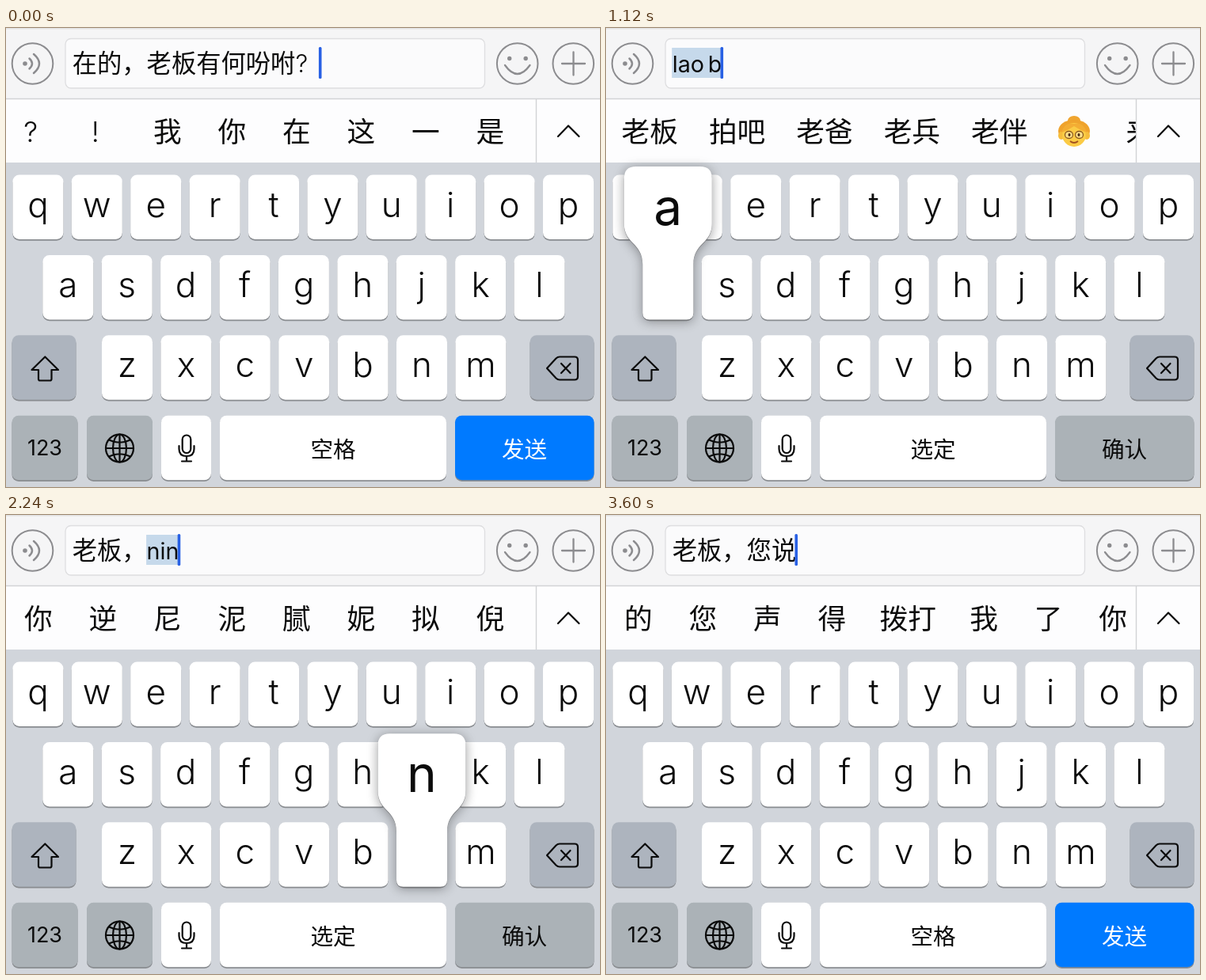
Write an HTML page that moves like this. It is 750x580 px and loops after 3640 ms.

```html
<!DOCTYPE html>
<html lang="zh-CN">
<head>
<meta charset="utf-8">
<style>
  html, body { margin: 0; width: 100%; height: 100%; overflow: hidden; background: #d1d5db; }
  svg { display: block; width: 750px; height: 580px; }
  text { font-family: Inter, "Noto Sans CJK SC", "Noto Sans CJK", sans-serif; font-weight: 400; fill: #0b0b0b; }
  .mid { text-anchor: middle; }
  .key { font-size: 44px; font-weight: 300; text-anchor: middle; }
  .label { font-size: 28.6px; font-weight: 300; text-anchor: middle; }
  .cand { font-size: 35.7px; font-weight: 300; }
  .field { font-size: 31.3px; font-weight: 300; }
  .icon { fill: none; stroke: #0b0b0b; stroke-width: 2.2; stroke-linejoin: round; stroke-linecap: round; }
  .tool { fill: none; stroke: #8c8c8f; stroke-width: 2; stroke-linecap: round; }
  #pop path { fill: #fff; filter: drop-shadow(0 2px 7px rgba(0, 0, 0, .28)) drop-shadow(0 1px 0 #898b8f); }
</style>
</head>
<body>
<svg viewBox="0 0 750 580">
  <rect width="750" height="580" fill="#d1d5db"/>
  <rect width="750" height="90" fill="#f5f5f6"/>
  <rect width="750" height="1.5" fill="#e3e3e4"/>
  <rect x="75" y="13.5" width="529.5" height="62.5" rx="7" fill="#fbfbfc" stroke="#dedee0" stroke-width="1.3"/>
  <g class="tool">
    <circle cx="33.5" cy="45" r="25.8"/>
    <circle cx="645.7" cy="45" r="25.8"/>
    <circle cx="716.3" cy="45" r="25.8"/>
    <path d="M29.5 38.5Q36.5 45 29.5 51.5M35 33Q49 45 35 57" stroke-width="2.5"/>
    <path d="M630 47Q645.7 69 661.500 47M702 45H731M716.500 30.500V59.500" stroke-width="2.3"/>
    <g fill="#8c8c8f" stroke="none">
      <circle cx="24" cy="45" r="2.8"/>
      <circle cx="635.7" cy="38.5" r="2.7"/>
      <circle cx="656.2" cy="38.5" r="2.7"/>
    </g>
  </g>
  <rect id="mark" y="25" height="38" fill="#c6d9eb"/>
  <text id="done" class="field" y="56"></text>
  <text id="typing" y="55.500" font-size="28.7"></text>
  <rect id="caret" y="24" width="3.600" height="40" rx="1.500" fill="#2860e4"/>

  <rect y="90" width="750" height="80" fill="#fdfdfe"/>
  <g id="cands"></g>
  <rect x="669" y="90" width="81" height="80" fill="#fdfdfe"/>
  <path d="M0 89.500H750M669.500 90V170" stroke="#d2d3d5" stroke-width="1.400"/>
  <path d="M697 137L710 123.500L723.500 137" class="icon" stroke-linecap="butt"/>

  <g id="keys"></g>
  <path class="icon" d="M49.300 415.500L66 432H57.500V443.500Q57.500 445.500 55.500 445.500H43Q41 445.500 41 443.500V432H32.500Z"/>
  <g id="del" class="icon">
    <path d="M683 430L694.500 417.500Q696.500 415.500 699 415.500H718Q722 415.500 722 419.500V440.500Q722 444.500 718 444.500H699Q696.500 444.500 694.500 442.500Z"/>
    <path id="cross" d="M701 424L712.500 436M712.500 424L701 436"/>
  </g>
  <g class="icon" stroke-width="2">
    <circle cx="143.500" cy="531" r="17.500"/>
    <ellipse cx="143.500" cy="531" rx="8.500" ry="17.500"/>
    <path d="M126 531H161M143.500 513.500V548.500M130 520.500Q143.500 527 157 520.500M130 541.500Q143.500 535 157 541.500"/>
    <rect x="222.700" y="514.500" width="10.600" height="22.500" rx="5.300"/>
    <path d="M218.500 528V532Q218.500 541 228 541T237.500 532V528M228 541V547M222 547.500H234"/>
  </g>
  <text x="49" y="540" class="mid" font-size="27">123</text>
  <text id="space" x="413" y="543" class="label"></text>
  <text id="send" x="654.500" y="543" class="label"></text>
  <g id="pop"><path/><text class="mid" font-size="64" font-weight="300"></text></g>
</svg>
<script>
const LOOP = 3640, STEP = 40, X0 = 83.7, EM = 31.3, GAP = '\u2006';
const $ = id => document.getElementById(id);

function add(parent, tag, attrs, text = '') {
  const el = document.createElementNS('http://www.w3.org/2000/svg', tag);
  set(el, attrs);
  el.textContent = text;
  parent.append(el);
  return el;
}
function set(el, attrs) {
  for (const name in attrs) el.setAttribute(name, attrs[name]);
}

// Keyboard
const GREY = '#adb4be', DIM = '#abb2b7';
const keyPos = {};
function cap(x, y, w, fill = '#fff') {
  add($('keys'), 'rect', { x, y: y + 1.8, width: w, height: 81.500, rx: 8.500, fill: '#898c90' });
  return add($('keys'), 'rect', { x, y, width: w, height: 81.500, rx: 8.500, fill });
}
[['qwertyuiop', 8.400, 185.500], ['asdfghjkl', 46.300, 287], ['zxcvbnm', 121, 388.300]].forEach(([row, left, y]) => {
  [...row].forEach((ch, i) => {
    const x = left + i * 74.400;
    keyPos[ch] = { x, y };
    cap(x, y, 64);
    add($('keys'), 'text', { x: x + 32, y: y + 53, class: 'key' }, ch);
  });
});
cap(7.500, 388.300, 81, GREY);
const delCap = cap(661.500, 388.300, 81, GREY);
cap(7.500, 489.800, 83, DIM);
cap(102, 489.800, 83, DIM);
cap(196, 489.800, 63);
cap(270, 489.800, 286);
const sendCap = cap(567, 489.800, 175.500, DIM);

// Timeline: [time, committed text, composing text]
const full = '在的，老板有何吩咐?', lead = '老板，';
const texts = [[0, full, ''], [80, full.slice(0, -1), '']];
for (let i = 8; i >= 0; i--) texts.push([200 + (8 - i) * STEP, full.slice(0, i), '']);

const presses = [
  [880, 'l'], [960, 'a'], [1000, 'o'], [1040, 'b'], [1120, 'a'], [1200, 'n'],
  [2040, 'n'], [2120, 'i'], [2200, 'n'], [2320, 's'], [2400, 'h'], [2480, 'u'], [2520, 'o']
];
function compose(keys, before, gapAt) {
  let word = '';
  keys.forEach(([t, ch]) => {
    word += (word.length === gapAt ? GAP : '') + ch;
    texts.push([t + STEP, before, word]);
  });
}
compose(presses.slice(0, 6), '', 3);
texts.push([1400, '老板', ''], [1760, lead, '']);
compose(presses.slice(6), lead, 3);
texts.push([2880, lead + '您说', '']);

const idle = '我 你 这 在 一 是 好 有';
const hints = [
  [0, '? ! 我 你 在 这 一 是'], [240, idle],
  [960, '了 来 里 啦 老 两 连 路'], [1040, '拉 啦 来 老 辣 蓝 浪 落'], [1080, '老 捞 劳 牢 姥 烙 涝 佬'],
  [1120, '老板 拍吧 老爸 老兵 老伴 @ 来'], [1240, '老爸 老板 老八 老伴 老把 捞'],
  [1280, '老板 老伴 老班 老版 老办 捞'], [1400, '说 的 你 是 给 不 还 来'], [1760, idle],
  [2120, '你 那 年 呢 能 哪 拿 女'], [2200, '你 逆 尼 泥 腻 妮 拟 倪'], [2280, '您 恁 你 逆 尼 泥 腻 妮'],
  [2400, '您是 您说 您 恁 你 逆 尼'], [2480, '您是 您说 您 恁 你 逆 尼'], [2560, '您说 您是 您 恁 你 逆 尼'],
  [2600, '您说 进水 金水 您 恁 ninshuo'], [2880, '的 您 声 得 拨打 我 了 你']
];

const last = (list, t) => list.filter(e => e[0] <= t).pop();

function granny(g, x) {
  const e = add(g, 'g', { transform: `translate(${x} 131)` });
  const oval = (cx, cy, rx, ry, fill, stroke = 'none') =>
    add(e, 'ellipse', { cx, cy, rx, ry, fill, stroke, 'stroke-width': 1.3 });
  oval(0, -14, 8, 6, '#f0a52f');
  oval(0, -1, 20, 14, '#efa32d');
  oval(-16, 5, 4, 5, '#f6bd3c');
  oval(16, 5, 4, 5, '#f6bd3c');
  oval(0, 4, 15, 15, '#fbcb45');
  add(e, 'path', { d: 'M-16 1Q-12-13 0-10Q12-13 16 1Q7-2 0-7Q-7-2-16 1Z', fill: '#f3ad34' });
  oval(-6.500, 4, 5, 4.500, '#fde08a', '#8c5a20');
  oval(6.500, 4, 5, 4.500, '#fde08a', '#8c5a20');
  oval(-6, 4, 1.500, 2, '#4a2b13');
  oval(6, 4, 1.500, 2, '#4a2b13');
  add(e, 'path', { d: 'M-5 12Q0 16 5 12', fill: 'none', stroke: '#a3511f', 'stroke-width': 1.800 });
}

let shown;
function showHints(words) {
  if (words === shown) return;
  shown = words;
  const g = $('cands');
  g.replaceChildren();
  let x = 0;
  for (const word of words.split(' ')) {
    const latin = /^[a-z]/.test(word);
    let w = Math.max(81.500, word.length * 35.700 + 39);
    if (word === '@') granny(g, x + 39);
    else {
      const el = add(g, 'text', { x: x + 19.500, y: 144, class: 'cand' }, word);
      if (latin) {
        el.style.fontSize = '34px';
        el.style.fontWeight = 400;
        w = el.getComputedTextLength() + 39;
      } else if (word.length === 1) {
        set(el, { x: x + w / 2 - (/[?!]/.test(word) ? 9.500 : 0), class: 'cand mid' });
      }
    }
    x += w;
  }
}

function showPop(t) {
  const hit = presses.filter(p => p[0] <= t && t < p[0] + 80).pop();
  $('pop').style.display = hit ? '' : 'none';
  if (!hit) return;
  const { x, y } = keyPos[hit[1]], r = x + 64, l = x - 23.500, q = r + 23.500, top = y - 112;
  const [shape, letter] = $('pop').children;
  set(shape, { d: `M${l + 15} ${top}H${q - 15}Q${q} ${top} ${q} ${top + 15}V${y - 40}
    C${q} ${y - 14} ${r} ${y - 16} ${r} ${y + 12}V${y + 73}Q${r} ${y + 81.500} ${r - 8.500} ${y + 81.500}
    H${x + 8.500}Q${x} ${y + 81.500} ${x} ${y + 73}V${y + 12}C${x} ${y - 16} ${l} ${y - 14} ${l} ${y - 40}
    V${top + 15}Q${l} ${top} ${l + 15} ${top}Z` });
  set(letter, { x: x + 32, y: y - 38.500 });
  letter.textContent = hit[1];
}

function blink(dt) {
  const p = dt % 320;
  if (p < 100) return 1;
  if (p < 180) return 1 - (p - 100) / 80;
  return p < 240 ? 0 : (p - 240) / 80;
}

function draw(t) {
  const [since, done, typing] = last(texts, t);
  const start = X0 + done.length * EM;
  $('done').textContent = done;
  set($('done'), { x: [...done].map((_, i) => X0 + i * EM).join(' ') });
  $('typing').textContent = typing;
  set($('typing'), { x: start });
  const width = typing ? $('typing').getComputedTextLength() : 0;
  set($('mark'), { x: start - 0.500, width });
  set($('caret'), { x: start + width - 1.800, opacity: blink(t - since) });

  const ready = done && !typing;
  $('space').textContent = typing ? '选定' : '空格';
  $('send').textContent = typing ? '确认' : '发送';
  $('send').style.fill = typing ? '#0b0b0b' : ready ? '#fff' : '#73797f';
  set(sendCap, { fill: ready ? '#007aff' : DIM });

  const held = t >= 80 && t < 880;
  set(delCap, { fill: held ? '#fff' : GREY });
  $('del').firstElementChild.style.fill = held ? '#000' : 'none';
  $('cross').style.stroke = held ? '#fff' : '';

  showHints(last(hints, t)[1]);
  showPop(t);
}

const begin = performance.now();
function tick() {
  const t = (performance.now() - begin) % LOOP;
  draw(Math.floor(t / STEP) * STEP);
  requestAnimationFrame(tick);
}
tick();
</script>
</body>
</html>
```
